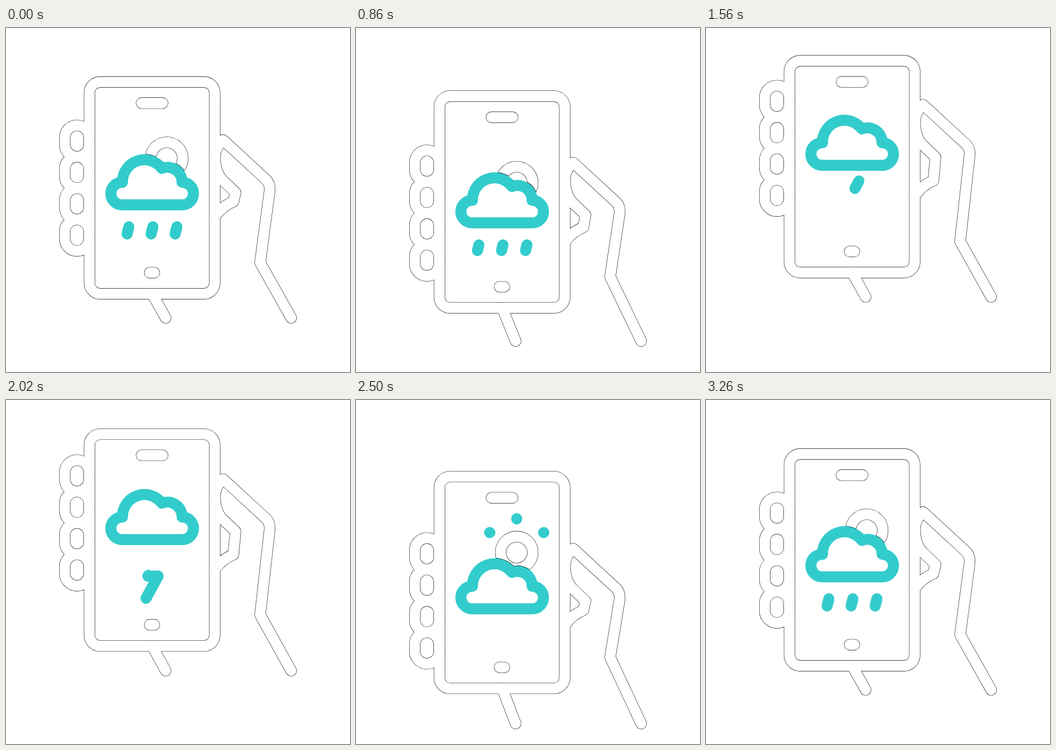
An HTML page that plays this animation: 640 by 640 pixels, repeating every 3.6 s.

```html
<!DOCTYPE html>
<html lang="en">
<head>
<meta charset="utf-8">
<title>Weather on a phone</title>
<style>
  html, body { margin: 0; width: 100%; height: 100%; overflow: hidden; background: #fff; }
  svg { display: block; width: 100vw; height: 100vh; }
  path { fill: none; stroke-linecap: round; stroke-linejoin: round; }
  #ink path { stroke: #000; stroke-width: 20.9; }
  #paper path { stroke: #fff; stroke-width: 19.7; }
  #rim { stroke: #000; stroke-width: 21.8; }
  .teal { stroke: #33cccc; stroke-width: 20.5; }
  #cloud { fill: #fff; }
</style>
</head>
<body>
<svg viewBox="0 0 640 640">
  <defs>
    <clipPath id="ring"><path id="ringShape" clip-rule="evenodd"/></clipPath>
  </defs>
  <g id="ink"></g>
  <g id="paper"></g>
  <g clip-path="url(#ring)"><path id="rim"/></g>
  <path id="cloud" class="teal"/>
  <g id="rain"></g>
  <g id="bolt"></g>
  <g id="rays"></g>
</svg>
<script>
const LOOP = 3600;
const $ = id => document.getElementById(id);

function addPath(parent, d = '', attrs = {}) {
  const el = document.createElementNS('http://www.w3.org/2000/svg', 'path');
  el.setAttribute('d', d);
  for (const key in attrs) el.setAttribute(key, attrs[key]);
  return $(parent).appendChild(el);
}

const shift = (el, y) => el.setAttribute('transform', `translate(0 ${y.toFixed(3)})`);

function ease(t, from, to) {
  const p = Math.min(1, Math.max(0, (t - from) / (to - from)));
  return p * p * (3 - 2 * p);
}

const circle = (x, y, r) =>
  `M${x - r} ${y}a${r} ${r} 0 1 1 ${2 * r} 0a${r} ${r} 0 1 1 ${-2 * r} 0Z`;

const roundRect = (x, y, w, h, r) =>
  `M${x + r} ${y}h${w - 2 * r}a${r} ${r} 0 0 1 ${r} ${r}v${h - 2 * r}` +
  `a${r} ${r} 0 0 1 ${-r} ${r}h${2 * r - w}a${r} ${r} 0 0 1 ${-r} ${-r}` +
  `v${2 * r - h}a${r} ${r} 0 0 1 ${r} ${-r}Z`;

// Thin outlines: every shape is inked first, then covered by a narrower white stroke.
function outline(d) {
  const layers = [addPath('ink', d), addPath('paper', d)];
  return {
    shift: y => layers.forEach(el => shift(el, y)),
    draw: d => layers.forEach(el => el.setAttribute('d', d))
  };
}

const phone = outline(
  roundRect(155.25, 100.5, 233, 394, 20) + 'M252 139.8H291.4M267.2 455.2H276');
const fingers = outline([0, 1, 2, 3]
  .map(i => roundRect(109.4, 181.1 + 58.4 * i, 45.3, 58.4, 22.65)).join(''));
const sun = outline(circle(299, 242.4, 29.8));
const hand = outline();
const sleeve = outline();

$('ringShape').setAttribute('d', circle(299, 242.4, 40) + circle(299, 242.4, 19.6));

const cloudShape = 'M328 329H215.5A21 21 0 0 1 216.7 287A40.8 40.8 0 0 1 290 261.3' +
  'A27.2 27.2 0 0 1 327.6 287A21 21 0 0 1 328 329Z';
$('rim').setAttribute('d', cloudShape);
$('cloud').setAttribute('d', cloudShape);

const teal = (parent, d) => addPath(parent, d, { class: 'teal', pathLength: 1 });
const marks = {
  rain: [228.6, 273.3, 318].map(x => teal('rain', `M${x} 369.8l-3.3 13.4`)),
  bolt: [teal('bolt', 'M284.5 358L264 396.8H283L260.5 438.2')],
  rays: ['M249 205.3l-12.3 -4.6', 'M299 179.8v-12.3', 'M349 205.3l12.3 -4.6']
    .map(d => teal('rays', d))
};

// Each cycle: grow from, grow to, shrink from, shrink to.
const cycles = {
  rain: [[-500, -100, 0, 370], [620, 960, 960, 1340], [2820, 3250, 4000, 4400]],
  bolt: [[1470, 1850, 1860, 2240]],
  rays: [[2460, 2840, 2860, 3245]]
};

function trim(name, t) {
  const c = cycles[name].find(c => t > c[0] && t < c[3]);
  $(name).style.display = c ? '' : 'none';
  if (!c) return;
  const tail = ease(t, c[2], c[3]);
  const head = ease(t, c[0], c[1]);
  for (const el of marks[name]) {
    el.setAttribute('stroke-dasharray', `${Math.max(0.001, head - tail)} 9`);
    el.setAttribute('stroke-dashoffset', -tail);
  }
}

function render(t) {
  const drop = ease(t, 0, 362), lift = ease(t, 620, 1435);
  const fall = ease(t, 1970, 2450);
  const offset = (low, high, secondLow = low, restAt = 2975) =>
    low * (drop - lift) + high * (lift - fall) + secondLow * (fall - ease(t, 2440, restAt));

  const phoneY = offset(43.7, -39.5);
  const handY = offset(70.5, -65.6);
  const palmY = offset(70.5, -39);
  const armY = offset(65, -39);
  const cloudY = offset(62.2, -73.5, 62, 2950);
  const sunY = offset(62.8, -19, 43);

  phone.shift(phoneY);
  fingers.shift(offset(78.7, -74));
  sun.shift(sunY);
  shift($('ringShape'), sunY);
  shift($('rays'), sunY);
  for (const id of ['rim', 'cloud', 'rain', 'bolt']) shift($(id), cloudY);

  const h = y => y + handY, m = y => y + palmY;
  hand.draw(`M530.5 ${539.3 + armY}L472.8 ${436.5 + phoneY}L490.3 ${h(304)}` +
    `Q492 ${h(289.3)} 483 ${h(281.3)}L404 ${h(208.5)}` +
    `C394 ${h(217)} 388.8 ${h(228)} 388.8 ${h(241)}` +
    `C388.8 ${h(262)} 396 ${h(277)} 405 ${h(285)}L427 ${h(306)}` +
    `L423 ${m(323)}Q400 ${m(333)} 388.8 ${m(351)}`);
  sleeve.draw(`M272 ${494.7 + phoneY}L297 ${539.3 + armY}`);

  for (const name in marks) trim(name, t);
}

const start = performance.now();
function tick() {
  render((performance.now() - start) % LOOP);
  requestAnimationFrame(tick);
}
tick();
</script>
</body>
</html>
```
